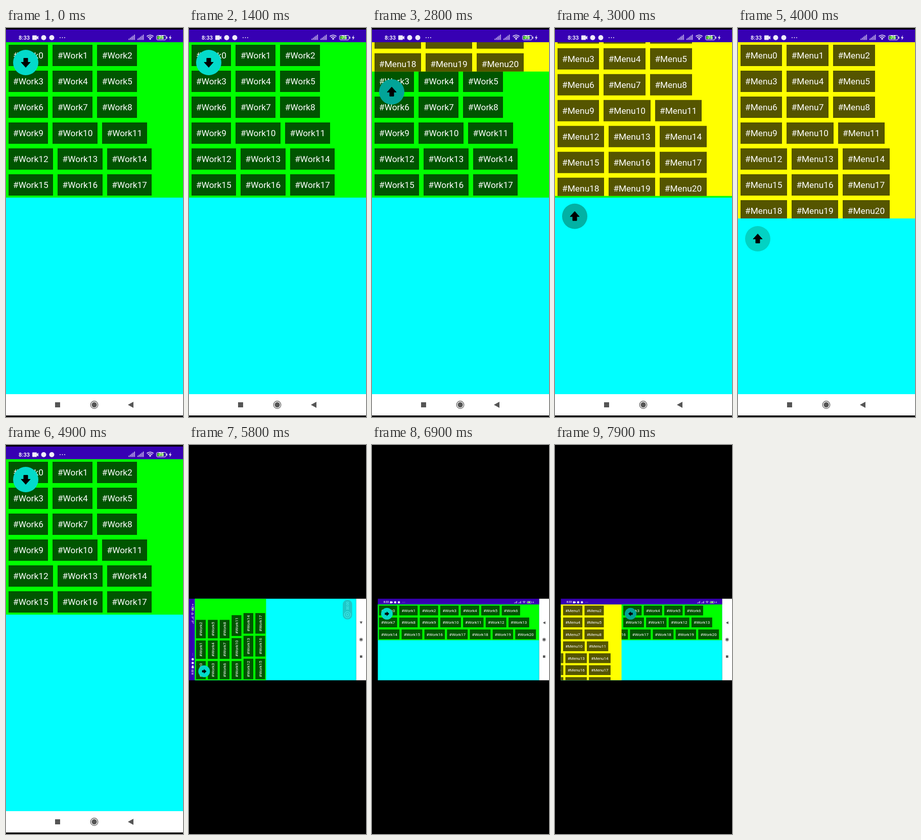
These frames come from a looping animation (350 px wide and 766 px high, 8000 ms). An HTML page:

```html
<!DOCTYPE html>
<html lang="en">
<head>
<meta charset="utf-8">
<title>Sliding menu</title>
<style>
  html, body { margin: 0; width: 100%; height: 100%; overflow: hidden; background: #000; }
  #stage { position: relative; width: 350px; height: 766px; overflow: hidden; background: #000; }
  #window { position: absolute; inset: 0; }
  .screen { position: absolute; width: 350px; height: 760px; left: 0; top: 3px; background: #000; overflow: hidden; }
  .land { width: 760px; height: 350px; left: -205px; top: 208px; }
  .screen > *, .content > * { position: absolute; }
  .status { left: 0; top: 0; width: 350px; height: 25px; background: #3700b3; overflow: hidden; }
  .status svg { position: absolute; top: -1px; }
  .content { left: 0; top: 25px; width: 350px; height: 693px; background: #0ff; overflow: hidden; }
  .nav { left: 0; top: 718px; width: 350px; height: 42px; background: #fff; }
  .land .status { left: 25px; width: 693px; }
  .land .content { left: 25px; width: 693px; height: 325px; }
  .land .nav { left: 718px; top: 0; width: 42px; height: 350px; }
  .list { left: 0; top: 0; width: 100%; overflow: hidden; }
  .work { background: #0f0; }
  .menu { background: #ff0; height: 347px; }
  .land .menu { width: 347px; height: 100%; }
  .row { display: flex; height: 51px; }
  .chip { flex: none; margin: 4.5px; height: 42px; padding: 0 9.5px; color: #fff; white-space: nowrap;
          background: rgba(0, 0, 0, .667); font: 17.3px/42px Roboto, sans-serif; }
  .fab { left: 14px; top: 14.5px; width: 50px; height: 50px; border-radius: 50%; }
  .pill { left: 260px; top: 660px; }
</style>
</head>
<body>
<div id="stage"><div id="window"></div></div>
<script>
const LOOP = 8000, SLIDE = 347, SLIDE_MS = 400, SCALE = 350 / 760;
const OPEN = 2694, CLOSE = 4100, CUT = 5500, TURN = 6400, TURN_MS = 400, REOPEN = 7634;

const rows = (name, count, columns) => {
  let html = '';
  for (let i = 0; i < count; i++) {
    if (i % columns === 0) html += (i ? '</div>' : '') + '<div class="row">';
    html += `<span class="chip">#${name}${i}</span>`;
  }
  return html + '</div>';
};

const signal = x => [0, 1, 2, 3, 4].map(i =>
  `<rect x="${x + i * 2.7}" y="${19 - i * 2}" width="1.5" height="${2.5 + i * 2}"/>`).join('');

const statusBar = `<div class="status">
  <svg width="130" height="26" fill="#f0ebfa">
    <text x="25" y="20.5" font-family="Roboto, sans-serif" font-size="11" font-weight="700">8:33</text>
    <path d="M53 12.5h7q1 0 1 1v2l3-2.3v7.6l-3-2.3v2q0 1-1 1h-7q-1 0-1-1v-7q0-1 1-1z"/>
    <circle cx="74.5" cy="17" r="5"/><circle cx="90.5" cy="17" r="5"/>
    <circle cx="107" cy="17" r="1"/><circle cx="111.5" cy="17" r="1"/><circle cx="116" cy="17" r="1"/>
  </svg>
  <svg width="110" height="26" style="right:0" fill="#f0ebfa">
    <g opacity=".85">${signal(2.5)}${signal(20)}</g>
    <g fill="none" stroke="#f0ebfa" stroke-width="1.6">
      <path d="M38.5 14.5q6.5-5 13 0M40.7 17q4.3-3.3 8.6 0"/>
      <rect x="57.5" y="12.5" width="19" height="9" rx="2.5" stroke-width="1"/>
    </g>
    <path d="M42.5 18.8q2.5-2 5 0L45 21.5zM77.5 15h1.5v4h-1.5z"/>
    <rect x="59" y="14" width="13" height="6" rx="1" fill="#5c3"/>
    <text x="67" y="20" text-anchor="middle" font-family="Roboto, sans-serif" font-size="8.5" font-weight="700">75</text>
    <path d="M86 12l-4 5.7h2.5l-1 4.3 4-5.8h-2.5z"/>
  </svg></div>`;

const navBar = land => {
  const at = x => `transform="translate(${land ? `21 ${350 - x}` : `${x} 21`})"`;
  return `<svg class="nav" fill="#555">
    <rect ${at(102)} x="-5" y="-5" width="10" height="10"/>
    <g ${at(174.5)}><circle r="7.3" fill="none" stroke="#555" stroke-width="1.2"/><circle r="5.2"/></g>
    <path ${at(246.5)} d="M-5.5 0l11-6v12z"/></svg>`;
};

const pill = `<svg class="pill" width="85" height="41">
  <rect width="85" height="41" rx="20.5" fill="#566"/>
  <g fill="none" stroke="#dee" stroke-width="2"><circle cx="21" cy="20.5" r="13"/>
  <rect x="16" y="15.5" width="10" height="10" rx="2"/></g>
  <text x="42" y="26" fill="#dee" font-family="Roboto, sans-serif" font-size="14">00:00</text></svg>`;

function makeScreen(land) {
  const root = document.createElement('div');
  root.className = land ? 'screen land' : 'screen';
  root.innerHTML = `${statusBar}
    <div class="content">
      <div class="list work">${land ? rows('Work', 21, 7) : rows('Work', 18, 3)}</div>
      <div class="list menu">${rows('Menu', 21, 3)}</div>
      <div class="fab"><svg width="50" height="50" viewBox="-25 -25 50 50">
        <path d="M-4-8.5h8v8h5L0 9.5-9-.5h5z" stroke="#000" stroke-linejoin="round"/></svg></div>
    </div>${navBar(land)}${land ? '' : pill}`;
  document.getElementById('window').append(root);
  const find = s => root.querySelector(s);
  const menu = find('.menu'), fab = find('.fab'), arrow = find('.fab path');
  const axis = land ? 'X' : 'Y';
  return {
    pill: find('.pill'),
    update(open, isOpen, press) {
      menu.style.transform = `translate${axis}(${(open - 1) * SLIDE}px)`;
      fab.style.transform = `translate${axis}(${open * SLIDE}px)`;
      const k = 1 - .25 * press;
      fab.style.background = `rgb(${3 * k}, ${218 * k}, ${202 * k})`;
      arrow.setAttribute('transform', `rotate(${(land ? -90 : 0) + (isOpen ? 180 : 0)})`);
    },
    place(visible, angle, scale, opacity) {
      root.style.display = visible ? '' : 'none';
      root.style.transform = `rotate(${angle}deg) scale(${scale})`;
      root.style.opacity = opacity;
    }
  };
}

const portrait = makeScreen(false), landscape = makeScreen(true);
const view = document.getElementById('window');

const clamp = x => Math.min(1, Math.max(0, x));
const ease = x => .5 - Math.cos(Math.PI * clamp(x)) / 2;
const slide = (t, start) => ease((t - start) / SLIDE_MS);
const pulse = (t, from, to) => clamp((t - from) / 150) * clamp((to - t) / 200);

function draw(t) {
  const sideways = t >= CUT;
  const turn = ease((t - TURN) / TURN_MS);
  portrait.update(slide(t, OPEN) - slide(t, CLOSE), t >= OPEN && t < CLOSE,
    pulse(t, 2580, 3150) + pulse(t, 3980, 4450));
  landscape.update(slide(t, REOPEN), t >= REOPEN, pulse(t, 7560, 8300));
  portrait.place(turn < 1, sideways ? -90 + 90 * turn : 0, sideways ? SCALE : 1, 1 - turn);
  landscape.place(turn > 0, -90 + 90 * turn, SCALE, turn);
  portrait.pill.style.opacity = sideways ? clamp((6050 - t) / 700) : 0;
  view.style.clipPath = sideways ? 'inset(302px 0)' : 'none';
}

function tick(now) {
  draw(now % LOOP);
  requestAnimationFrame(tick);
}
draw(0);
requestAnimationFrame(tick);
</script>
</body>
</html>
```
